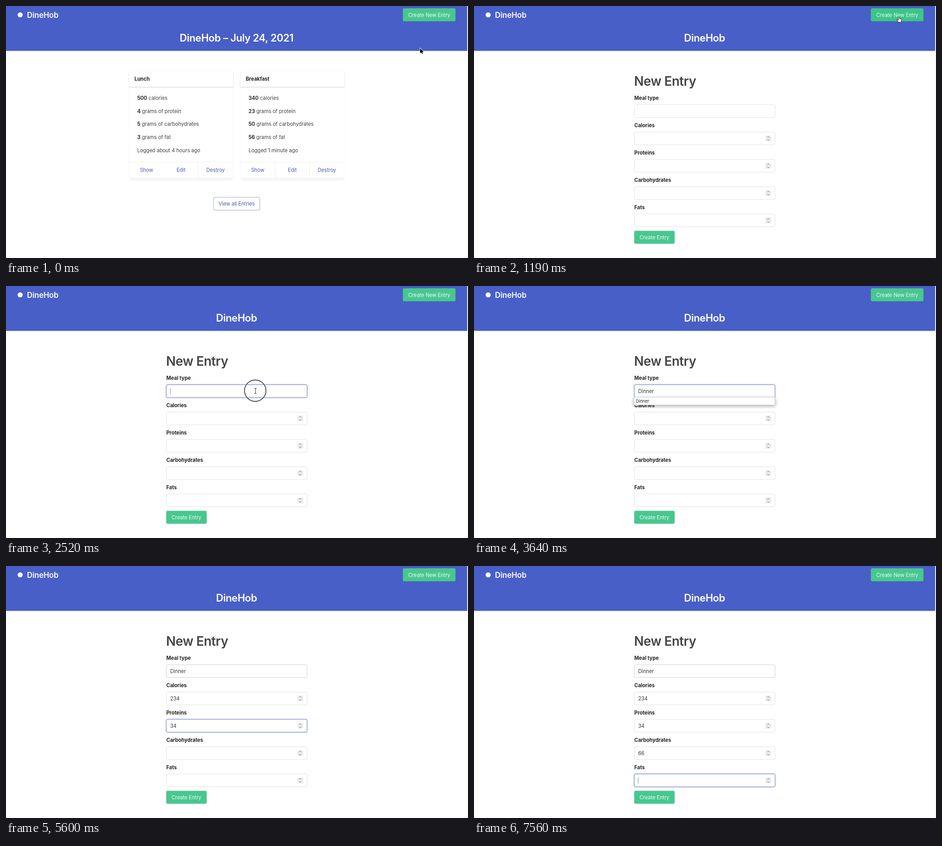
Write an HTML page with a canvas that moves like this. It is 1013x553 px and loops after 8000 ms.

```html
<!DOCTYPE html>
<html lang="en">
<head>
<meta charset="utf-8">
<title>Meal diary</title>
<style>
  html, body { margin: 0; width: 100%; height: 100%; overflow: hidden; background: #fff; }
  canvas { display: block; }
</style>
</head>
<body>
<canvas id="stage" width="1013" height="553"></canvas>
<script>
const ctx = document.getElementById('stage').getContext('2d');
const LOOP = 8000, STEP = 70;
const BLUE = '#485fc7', GREEN = '#48c78e', GREEN_HOVER = '#3ec487';
const INK = '#434343', DARK = '#262626', LINK = '#4c5bb0';
const BRAND = 'DineHob';
const BODY = 11.1;

const FORM_AT = 1190, LIST_SHOWN = 3430;
const FIELDS = [
  { label: 'Meal type', text: 'Dinner', focus: 2450, keys: [3080, 3290, 3430, 3500, 3570, 3640] },
  { label: 'Calories', text: '234', focus: 3710, keys: [4270, 4480, 4900] },
  { label: 'Proteins', text: '34', focus: 5040, keys: [5460, 5600] },
  { label: 'Carbohydrates', text: '66', focus: 5950, keys: [7140, 7350] },
  { label: 'Fats', text: '', focus: 7560, keys: [] },
];
const CARDS = [
  { x: 270, title: 'Lunch', values: [500, 4, 5, 3], logged: 'about 4 hours ago', dividers: [151] },
  { x: 514, title: 'Breakfast', values: [340, 23, 50, 56], logged: '1 minute ago', dividers: [76, 151] },
];
const UNITS = ['calories', 'grams of protein', 'grams of carbohydrates', 'grams of fat'];

// y is the middle of the capital letters
function text(str, x, y, { size = BODY, weight = 400, color = INK, align = 'left', track = -0.002 } = {}) {
  ctx.font = `${weight} ${size}px Inter, sans-serif`;
  ctx.letterSpacing = `${track * size}px`;
  ctx.textAlign = align;
  ctx.fillStyle = color;
  ctx.fillText(str, x, y + size * 0.364);
  return ctx.measureText(str).width;
}

function box(x, y, w, h, r, fill, stroke, line = 1) {
  ctx.beginPath();
  ctx.roundRect(x, y, w, h, r);
  if (fill) { ctx.fillStyle = fill; ctx.fill(); }
  if (stroke) { ctx.strokeStyle = stroke; ctx.lineWidth = line; ctx.stroke(); }
}

function shadowed(color, blur, dy, draw) {
  ctx.save();
  ctx.shadowColor = color;
  ctx.shadowBlur = blur;
  ctx.shadowOffsetY = dy;
  draw();
  ctx.restore();
}

function polyline(points) {
  ctx.beginPath();
  points.forEach(([x, y]) => ctx.lineTo(x, y));
}

function drawHeader(title, hovered) {
  box(0, 0, 1011.3, 98.6, 0, BLUE);
  box(1012, 99, 1, 454, 0, '#ececec');
  ctx.beginPath();
  ctx.arc(31, 19.5, 5.5, 0, Math.PI * 2);
  ctx.fillStyle = '#fff';
  ctx.fill();
  text(BRAND, 46, 20, { size: 16.65, weight: 600, color: '#fff', track: -0.003 });
  text(title, 505.5, 70, { size: 22.2, weight: 600, color: '#fff', align: 'center', track: -0.016 });
  box(870.2, 5, 115.3, 28.5, 3, hovered ? GREEN_HOVER : GREEN);
  text('Create New Entry', 928, 19.5, { color: '#effaf5', align: 'center' });
}

function drawCard({ x, title, values, logged, dividers }) {
  const w = 228;
  box(x, 146, w, 237.5, 7, '#f5f5f5');
  box(x, 142, w, 235, [3, 3, 0, 0], '#fff', '#f5f5f5');
  shadowed('rgba(10,10,10,.15)', 3, 1.5, () => box(x, 142, w, 35, [3, 3, 0, 0], '#fff'));
  text(title, x + 11.7, 159.5, { weight: 700, color: DARK });
  values.forEach((value, i) => {
    const y = 202 + i * 28.7;
    const width = text(String(value), x + 17.7, y, { weight: 700, color: '#303030' });
    text(UNITS[i], x + 17.7 + width + 3.1, y);
  });
  text('Logged ' + logged, x + 17.7, 316.5);
  box(x, 342, w, 1, 0, '#f0f0f0');
  dividers.forEach(dx => box(x + dx, 342, 1, 35, 0, '#eee'));
  ['Show', 'Edit', 'Destroy'].forEach((link, i) =>
    text(link, x + 38 + i * 75.8, 359.5, { color: LINK, align: 'center' }));
}

function drawDiary(hovered) {
  drawHeader(BRAND + ' – July 24, 2021', hovered);
  CARDS.forEach(drawCard);
  box(455, 419.8, 101.5, 28.2, 3, '#fff', '#9ba4cf');
  text('View all Entries', 505.7, 434, { color: LINK, align: 'center' });
}

function drawSpinner(x, y) {
  box(x - 6.5, y - 6.5, 13, 13, 1, '#ededed');
  ctx.strokeStyle = '#666';
  ctx.lineWidth = 1;
  for (const dir of [-1, 1]) {
    polyline([[x - 2.5, y + dir * 2], [x, y + dir * 4.5], [x + 2.5, y + dir * 2]]);
    ctx.stroke();
  }
}

function drawField(field, i, t, focused) {
  const y = 230.7 + i * 59.95;
  const value = field.text.slice(0, field.keys.filter(k => k <= t).length);
  text(field.label, 351.5, y - 28.3, { weight: 700, color: DARK });
  if (focused) box(350.8, y - 14.9, 309.9, 29.8, 4, null, 'rgba(72,95,199,.25)', 2);
  const border = focused ? '#7f8dd2' : i === 0 && value ? '#cfcfcf' : '#e2e2e2';
  box(351.5, y - 14, 308.5, 28, 3, '#fff', border);
  if (i > 0) drawSpinner(645.2, y);
  text(value, 360, y + 0.3, { color: '#363636' });
  const blinkOn = Math.floor((t - field.focus) / 500) % 2 === 0;
  if (focused && !value && blinkOn) box(359.6, y - 7, 1, 14, 0, '#888');
}

function drawSuggestion() {
  box(345, 243, 320, 25, 9, 'rgba(0,0,0,.045)');
  shadowed('rgba(0,0,0,.3)', 7, 2, () => box(351, 244, 308.5, 17, 0, '#fff'));
  box(351, 244, 308.5, 17, 0, '#fff', '#c9c9c9', 0.7);
  text('Dinner', 355, 252.5, { size: 9.4, color: '#222' });
}

function drawForm(t, hovered) {
  drawHeader(BRAND, hovered);
  text('New Entry', 351, 164.5, { size: 28, weight: 600, color: '#454545', track: -0.016 });
  const active = FIELDS.filter(f => f.focus <= t).pop();
  FIELDS.forEach((field, i) => drawField(field, i, t, field === active));
  if (t >= LIST_SHOWN && t < FIELDS[1].focus) drawSuggestion();
  box(351.3, 493.3, 88.7, 28.5, 3, GREEN);
  text('Create Entry', 395.6, 508, { color: '#effaf5', align: 'center' });
}

const progress = (t, from, to) => Math.min(1, Math.max(0, (t - from) / (to - from)));
const smooth = p => p * p * (3 - 2 * p);
const smoother = p => p * p * p * (p * (6 * p - 15) + 10);
const mix = (a, b, p) => a + (b - a) * p;

function pointerAt(t) {
  if (t < 1400) {
    const p = smooth(progress(t, 0, 560));
    return [mix(908, 931.5, p), mix(92.7, 24, p)];
  }
  const p = smoother(progress(t, 1470, 2380));
  return [mix(931.5, 547, p), mix(24, 230, p) + 17 * Math.sin(Math.PI * p)];
}

function drawArrow() {
  polyline([[0, 0], [0, 11], [2.6, 8.7], [4.3, 12.4], [6.1, 11.6], [4.5, 8], [7.8, 7.8]]);
  ctx.closePath();
  ctx.lineJoin = 'round';
  ctx.strokeStyle = '#fff';
  ctx.lineWidth = 1.8;
  ctx.stroke();
  ctx.fillStyle = '#000';
  ctx.fill();
}

function drawHand() {
  polyline([[-1.4, 0.6], [0, -0.4], [1.2, 0.6], [1.5, 4], [3.4, 4], [5.4, 4.8], [6.4, 6], [5.9, 9],
    [4.7, 12], [-0.6, 12], [-2.4, 9], [-4.4, 6.5], [-3.6, 5.4], [-1, 7]]);
  ctx.closePath();
  ctx.lineJoin = 'round';
  ctx.fillStyle = '#fff';
  ctx.fill();
  ctx.strokeStyle = '#111';
  ctx.lineWidth = 1;
  ctx.stroke();
}

function drawBeam() {
  for (const [color, width] of [['#fff', 2.6], ['#222', 1]]) {
    ctx.strokeStyle = color;
    ctx.lineWidth = width;
    ctx.beginPath();
    ctx.moveTo(-2.5, -6); ctx.lineTo(0, -5); ctx.lineTo(2.5, -6);
    ctx.moveTo(0, -5); ctx.lineTo(0, 5);
    ctx.moveTo(-2.5, 6); ctx.lineTo(0, 5); ctx.lineTo(2.5, 6);
    ctx.stroke();
  }
}

function drawRing(t, start) {
  const age = t - start;
  if (age < 0 || age >= 280) return;
  ctx.save();
  ctx.globalAlpha = age < 70 ? 0.5 : age < 210 ? 1 : 0.6;
  for (const [color, width] of [['rgba(255,255,255,.7)', 2.8], ['#14182c', 1.4]]) {
    ctx.beginPath();
    ctx.arc(-0.5, -0.3, 23.5, 0, Math.PI * 2);
    ctx.strokeStyle = color;
    ctx.lineWidth = width;
    ctx.stroke();
  }
  ctx.restore();
}

function draw(t) {
  const [x, y] = pointerAt(t);
  const overButton = x > 870 && x < 986 && y > 5 && y < 34;
  const overField = x < 660 && y > 216 && y < 245;
  ctx.fillStyle = '#fff';
  ctx.fillRect(0, 0, 1013, 553);
  if (t < FORM_AT) drawDiary(overButton);
  else drawForm(t, overButton);
  if (t >= FIELDS[0].keys[0]) return;
  ctx.save();
  ctx.translate(x, y);
  drawRing(t, 770);
  drawRing(t, 2380);
  if (overButton) drawHand();
  else if (overField) drawBeam();
  else drawArrow();
  ctx.restore();
}

const began = performance.now();
function tick() {
  const t = (performance.now() - began) % LOOP;
  draw(Math.floor(t / STEP) * STEP);
  requestAnimationFrame(tick);
}
tick();
</script>
</body>
</html>
```
